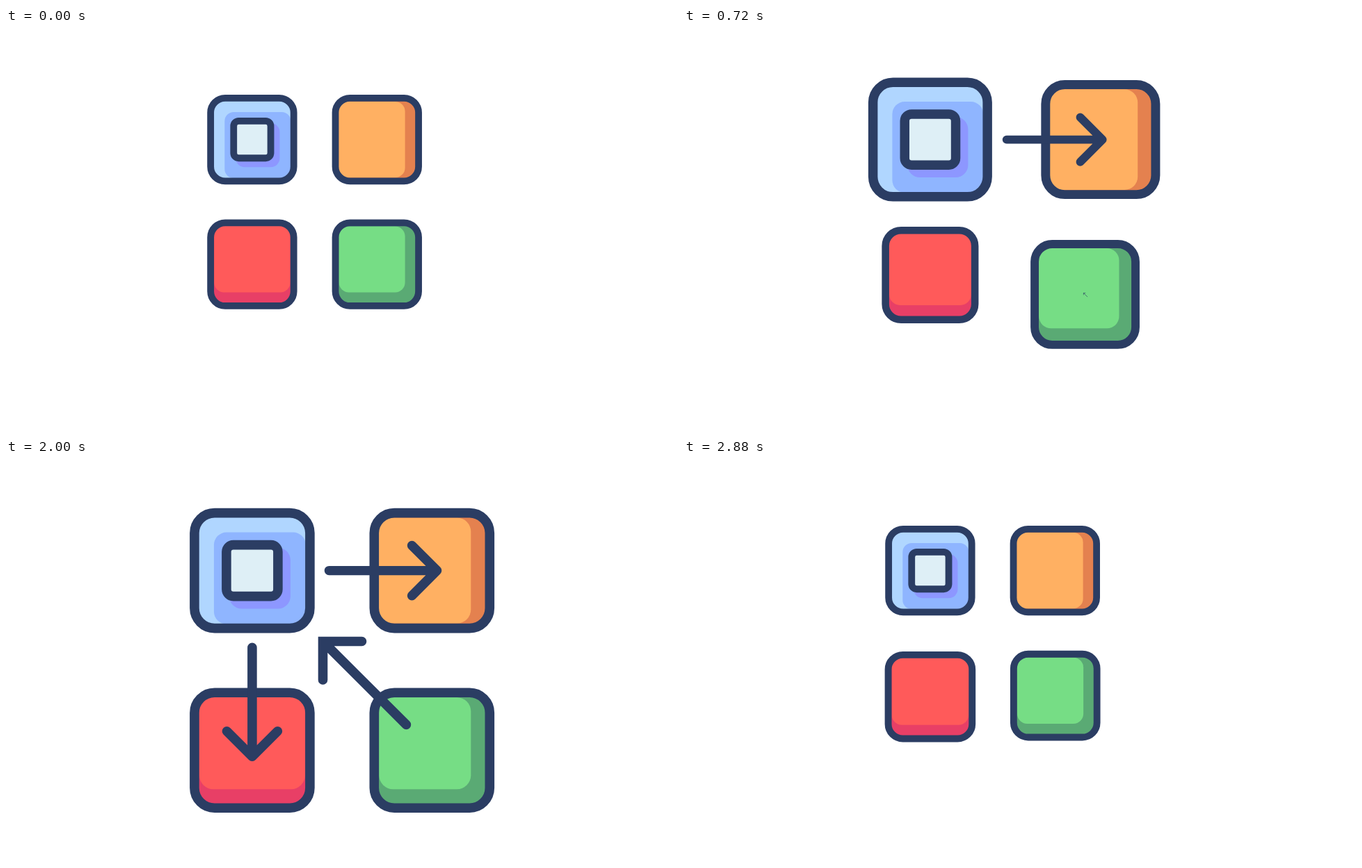
Animation of 966x580 px, one loop 2.96 s. Source, as an HTML page:

```html
<!DOCTYPE html>
<html lang="en">
<head>
<meta charset="utf-8">
<title>Tiles and arrows</title>
<style>
  html, body { margin: 0; width: 100%; height: 100%; overflow: hidden; background: #fff; }
  svg { display: block; width: 966px; height: 580px; }
  .line { fill: none; stroke: #2b3d63; stroke-width: 13.6; stroke-linecap: round; stroke-linejoin: round; }
</style>
</head>
<body>
<svg viewBox="0 0 966 580">
  <defs>
    <clipPath id="inside"><rect x="-80" y="-80" width="160" height="160" rx="26"/></clipPath>
    <rect id="frame" class="line" x="-83" y="-83" width="166" height="166" rx="29"/>
    <g id="arrow" class="line"><path d="M6.5 0H163.5M127 -36.5L163.5 0L127 36.5"/></g>
  </defs>

  <g id="blue">
    <g clip-path="url(#inside)">
      <rect x="-80" y="-80" width="160" height="160" fill="#b0d6ff"/>
      <rect x="-55" y="-55" width="132" height="132" rx="18" fill="#8fb5ff"/>
      <rect x="-33" y="-33" width="88" height="88" rx="18" fill="#8d97ff"/>
    </g>
    <rect class="line" x="-37" y="-37" width="74" height="74" rx="10" style="fill:#deeff6"/>
    <use href="#frame"/>
  </g>
  <g id="orange">
    <g clip-path="url(#inside)">
      <rect x="-80" y="-80" width="160" height="160" fill="#e4814f"/>
      <rect x="-100" y="-76" width="156" height="152" rx="20" fill="#ffb062"/>
    </g>
    <use href="#frame"/>
  </g>
  <g id="red">
    <g clip-path="url(#inside)">
      <rect x="-80" y="-80" width="160" height="160" fill="#e83f66"/>
      <rect x="-76" y="-100" width="152" height="156" rx="20" fill="#ff5a5a"/>
    </g>
    <use href="#frame"/>
  </g>
  <g id="green">
    <g clip-path="url(#inside)">
      <rect x="-80" y="-80" width="160" height="160" fill="#5aaa74"/>
      <rect x="-76" y="-76" width="132" height="132" rx="20" fill="#76dd85"/>
    </g>
    <use href="#frame"/>
  </g>

  <use id="right" href="#arrow"/>
  <use id="down" href="#arrow"/>
  <g id="diagonal" class="line"><path d="M-4.6 -4.6L-124.5 -124.5M-68.5 -124.5H-124.5V-69" style="stroke-linejoin:miter"/></g>
</svg>
<script>
const LOOP = 2960, STEP = 80, SMALL = 0.72, SHIFT = 79;

// Column, row, start of growing, start of shrinking
const tiles = {
  blue: [0, 0, 109, 2177],
  orange: [1, 0, 222, 2227],
  green: [1, 1, 325, 2276],
  red: [0, 1, 441, 2325],
};

// Tail x, tail y, rotation, start of growing, start of shrinking
const arrows = {
  right: [458, 160.6, 0, 376, 1914],
  diagonal: [580, 387, 0, 608, 2044],
  down: [353.9, 264.7, 90, 785, 2163],
};

function ease(x) {
  x = Math.min(1, Math.max(0, x));
  return x < 0.5 ? 4 * x ** 3 : 1 - 4 * (1 - x) ** 3;
}

function size(t, grow, growTime, shrink, shrinkTime) {
  return ease((t - grow) / growTime) - ease((t - shrink) / shrinkTime);
}

function place(id, transform) {
  document.getElementById(id).setAttribute("transform", transform);
}

function draw(t) {
  for (const [id, [col, row, grow, shrink]] of Object.entries(tiles)) {
    const p = size(t, grow, 765, shrink, 680);
    const x = 353.9 + col * (258.4 - SHIFT * (1 - p));
    const y = 160.6 + row * (258.6 - SHIFT * (1 - p));
    place(id, `translate(${x} ${y}) scale(${SMALL + (1 - SMALL) * p})`);
  }
  for (const [id, [x, y, turn, grow, shrink]] of Object.entries(arrows)) {
    const p = size(t, grow, 500, shrink, 600);
    place(id, `translate(${x} ${y}) rotate(${turn}) scale(${p})`);
    document.getElementById(id).style.display = p > 0.002 ? "" : "none";
  }
}

let start;
function tick(now) {
  start ??= now;
  const t = (now - start) % LOOP;
  draw(t - t % STEP);
  requestAnimationFrame(tick);
}
draw(0);
requestAnimationFrame(tick);
</script>
</body>
</html>
```
